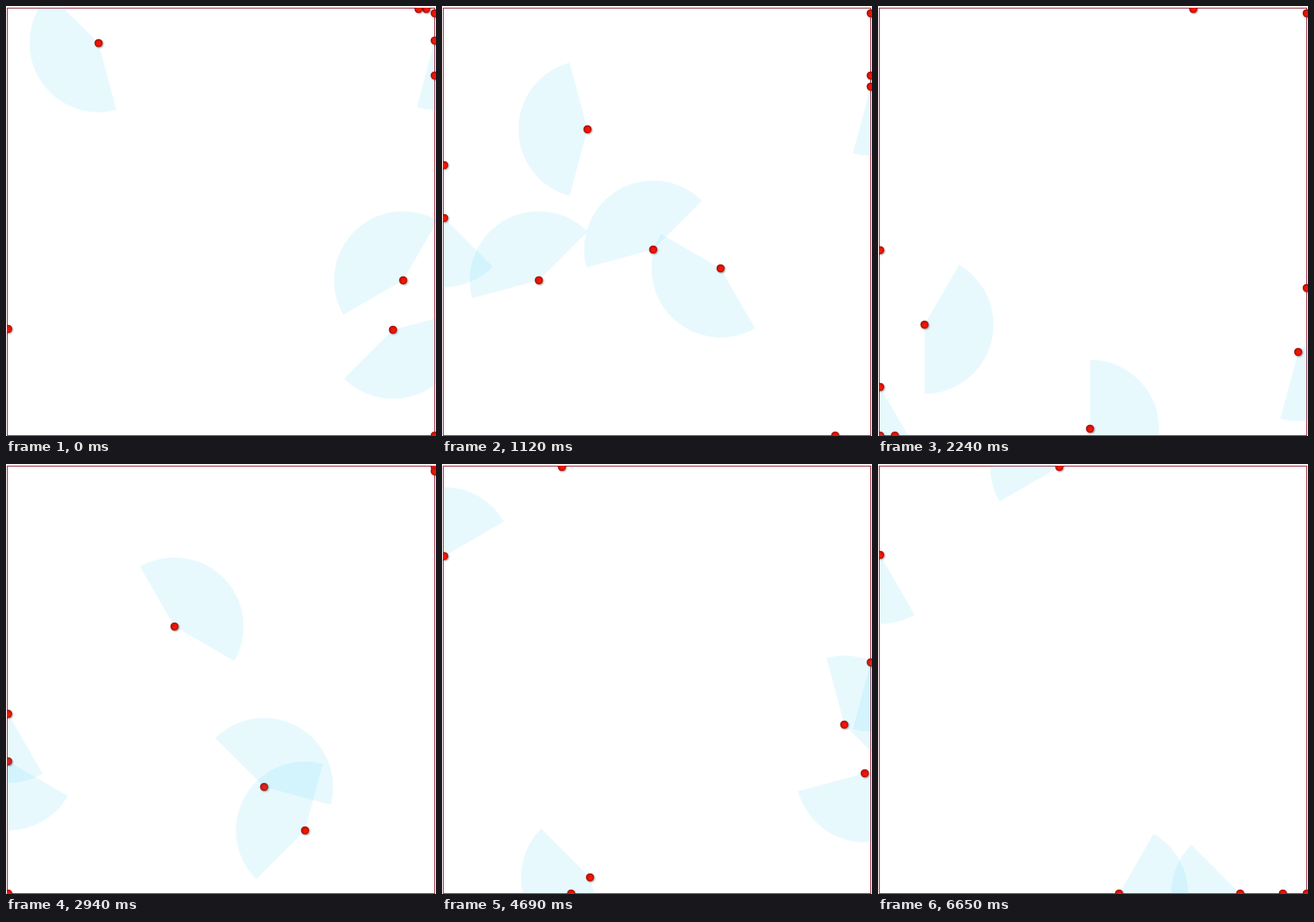
Animation, 504 px wide and 504 px high, one loop 6.72 s. Source, as an HTML page with a canvas:

```html
<!DOCTYPE html>
<html lang="en">
<head>
<meta charset="utf-8">
<title>Wandering agents</title>
<style>
  html, body { margin: 0; width: 100%; height: 100%; overflow: hidden; background: #fff; }
  canvas { display: block; }
</style>
</head>
<body>
<canvas id="stage" width="504" height="504"></canvas>
<script>
const ctx = document.getElementById('stage').getContext('2d');
const LOOP = 6720, TICK = 70, STEPS = 86;
const SIZE = 500, SIGHT = 81, HALF_VIEW = 75, TURN = 15;
const IDLE_TICKS = [3, 4, 45, 51, 52, 62, 75, 87, 88];
const STOPS = [0, 14, 30, 40, 52, 61, STEPS];

const rad = deg => deg * Math.PI / 180;
const deg = angle => angle * 180 / Math.PI;
const clamp = v => Math.max(0, Math.min(SIZE, v));

// An agent at a wall or in a corner faces it unless told otherwise
const facing = (x, y) => deg(Math.atan2((y === 0) - (y === SIZE), (x === SIZE) - (x === 0)));

// Key points "x y [heading]", one slot per stop. An empty slot is passed
// through; an agent waits at its first point and leaves after its last.
const agents = [
  '0 375, 0 245 240, 0 500',
  '451 376 300, 324 304 225, 246 492 15, 300 375 60, 500 331, 493 359 270, 472 500',
  '490 0, 245 282 120, 367 0, 500 0, 500 17 330, 500 229 330',
  ', , , 500 5, 500 170 330, 469 302 30, 422 500 210',
  '500 37 330, 500 91 330, 490 402 330, 348 426 150, 464 426 240',
  ', 500 78, 500 327',
  '463 318 135, 111 318 120, 52 370 -15, 195 187 45, 207 63 120, 138 0, 210 0 135',
  '106 40 210, 0 183, , 0 345 255, 179 476 30, 171 481 210, 280 500 -15',
  '481 0, 168 141 180, 0 443 225, , 0 105 105, , 0 103 225'
].map(route => route.split(',').flatMap((slot, i) => {
  if (!slot.trim()) return [];
  const [x, y, a = facing(x, y)] = slot.trim().split(' ').map(Number);
  return [{ at: STOPS[i], x, y, a }];
}));

const onSameWall = (p, q) =>
  ['x', 'y'].some(k => p[k] === q[k] && (p[k] === 0 || p[k] === SIZE));

const slide = (p, q, u) =>
  ({ x: p.x + (q.x - p.x) * u, y: p.y + (q.y - p.y) * u, a: p.a });

// Curve that leaves and arrives along the given headings
function steer(p, q, u) {
  const pull = Math.max(70, Math.hypot(q.x - p.x, q.y - p.y));
  const axis = (from, to, m0, m1) => {
    const d = to - from, b = 3 * d - 2 * m0 - m1, c = m0 + m1 - 2 * d;
    return [from + u * (m0 + u * (b + u * c)), m0 + u * (2 * b + 3 * u * c)];
  };
  const [x, dx] = axis(p.x, q.x, pull * Math.cos(rad(p.a)), pull * Math.cos(rad(q.a)));
  const [y, dy] = axis(p.y, q.y, -pull * Math.sin(rad(p.a)), -pull * Math.sin(rad(q.a)));
  return { x: clamp(x), y: clamp(y), a: Math.round(deg(Math.atan2(-dy, dx)) / TURN) * TURN };
}

function pose(route, step) {
  const next = route.findIndex(p => p.at >= step);
  if (next < 0) return null;
  const q = route[next], p = route[next - 1];
  if (!p || q.at === step) return q;
  return (onSameWall(p, q) ? slide : steer)(p, q, (step - p.at) / (q.at - p.at));
}

// One agent swings between the two lower corners
const patrol = step =>
  ({ x: clamp(SIZE / 2 + 400 * Math.cos(2 * Math.PI * step / STEPS)), y: SIZE, a: 270 });

function drawAgent({ x, y, a }) {
  ctx.beginPath();
  ctx.moveTo(x, y);
  ctx.arc(x, y, SIGHT, rad(-a - HALF_VIEW), rad(-a + HALF_VIEW));
  ctx.fillStyle = 'rgba(0, 185, 240, 0.092)';
  ctx.fill();

  ctx.save();
  ctx.shadowColor = 'rgba(0, 0, 0, 0.35)';
  ctx.shadowBlur = 2;
  ctx.shadowOffsetX = ctx.shadowOffsetY = 1;
  const shade = ctx.createRadialGradient(x + 0.8, y + 0.8, 1, x, y, 5);
  shade.addColorStop(0, '#f41800');
  shade.addColorStop(0.5, '#e01204');
  shade.addColorStop(1, '#96100c');
  ctx.fillStyle = shade;
  ctx.beginPath();
  ctx.arc(x, y, 4.8, 0, 2 * Math.PI);
  ctx.fill();
  ctx.restore();
}

function draw(now) {
  const tick = Math.floor((now % LOOP) / TICK);
  const step = tick - IDLE_TICKS.filter(t => t <= tick).length;
  ctx.fillStyle = '#fff';
  ctx.fillRect(0, 0, 504, 504);
  ctx.strokeStyle = '#9c3848';
  ctx.strokeRect(1.5, 2.5, SIZE + 1, SIZE + 1);

  ctx.save();
  ctx.beginPath();
  ctx.rect(1, 2, SIZE + 3, SIZE + 2);
  ctx.clip();
  ctx.translate(2.5, 3.5);
  for (const route of agents) {
    const spot = pose(route, step);
    if (spot) drawAgent(spot);
  }
  drawAgent(patrol(step));
  ctx.restore();
}

const start = performance.now();
function loop() {
  draw(performance.now() - start);
  requestAnimationFrame(loop);
}
loop();
</script>
</body>
</html>
```
